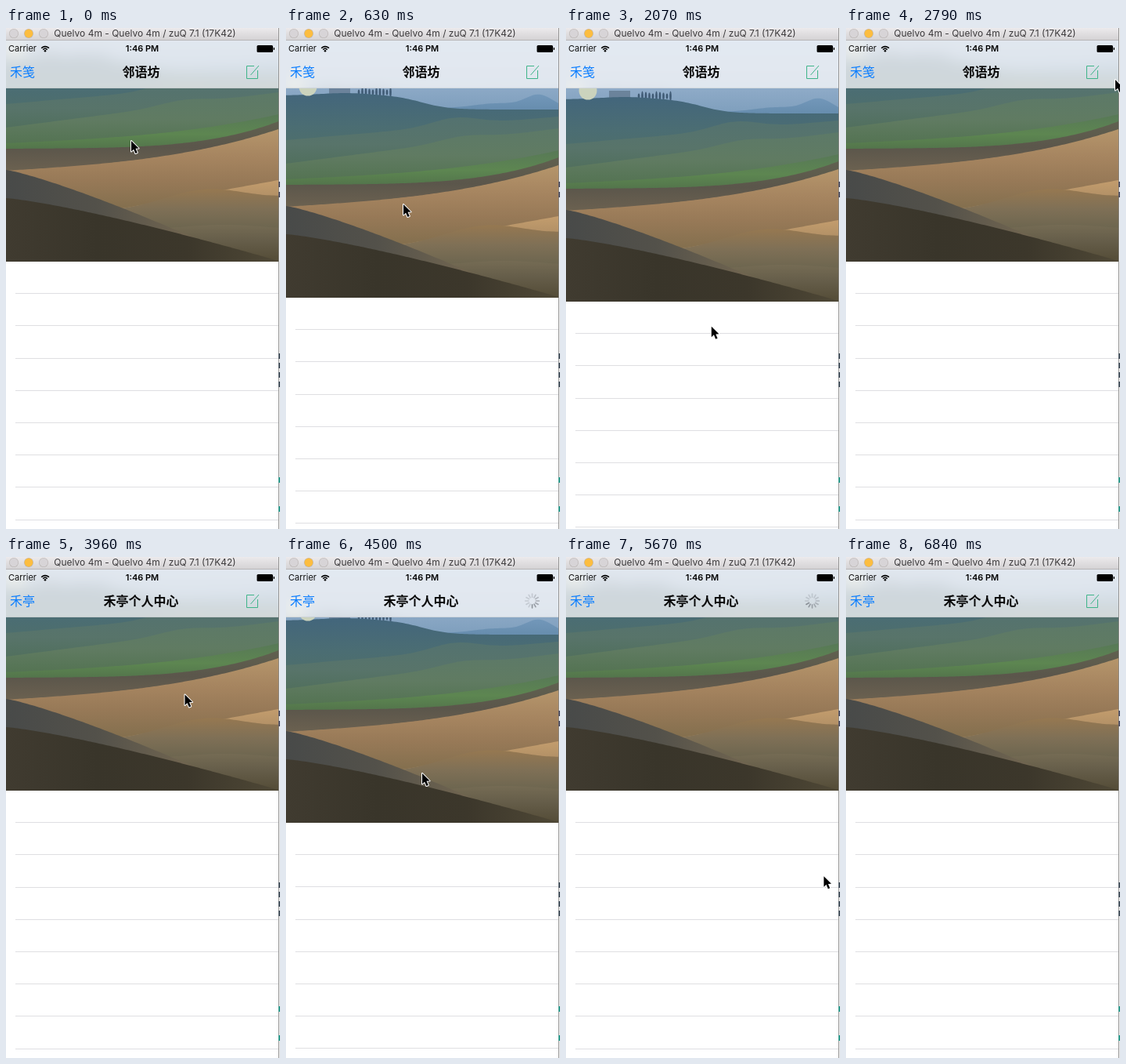
Write an HTML page with a canvas that moves like this. It is 350x639 px and loops after 7.2 s.

```html
<!DOCTYPE html>
<html lang="zh">
<head>
<meta charset="utf-8">
<style>
html, body { margin: 0; width: 100%; height: 100%; overflow: hidden; background: #fff; }
canvas { display: block; width: 350px; height: 639px; }
</style>
</head>
<body>
<canvas id="stage"></canvas>
<script>
const W = 350, H = 639, PAGE = 348, NAV_TOP = 16, NAV_BOTTOM = 77;
const LOOP = 7200, STEP = 90, LAST = 6840;
const REST = 297, PHOTO_H = 371, ROW = 41.2;
const LATIN = 'Inter, Roboto, sans-serif';
const HAN = '"Noto Sans CJK SC", "Noto Sans CJK", sans-serif';

const stage = document.getElementById('stage');
const ratio = window.devicePixelRatio || 1;
stage.width = W * ratio;
stage.height = H * ratio;
const ctx = stage.getContext('2d');

// Steady drag up to the release, then a decelerating return.
function tug(t, start, release, height) {
  if (t < start) return 0;
  if (t < release) return height * (t - start) / (release - start);
  return height * Math.max(0, 1 - (t - release) / 450) ** 2;
}
const pull = t => tug(t, 90, 1080, 84) + tug(t, 1530, 1980, 80) + tug(t, 4230, 5220, 151);

// Waypoints: time, x, y.
const route = [
  [0, 160, 144], [630, 150, 225], [1080, 162, 291], [1440, 162, 291], [1980, 166, 420],
  [2790, 344, 66], [3150, 380, 60], [4230, 178, 214], [4500, 174, 276], [5220, 166, 443], [5760, 362, 400]
];
function cursorAt(t) {
  const i = route.findIndex(point => point[0] > t);
  if (i < 0) return [W + 20, 0];
  const [t0, x0, y0] = route[i - 1], [t1, x1, y1] = route[i];
  const k = (t - t0) / (t1 - t0);
  return [x0 + (x1 - x0) * k, y0 + (y1 - y0) * k];
}

function disc(c, x, y, r, color) {
  c.fillStyle = color;
  c.beginPath();
  c.arc(x, y, r, 0, Math.PI * 2);
  c.fill();
}

function paintPhoto() {
  const photo = document.createElement('canvas');
  photo.width = PAGE;
  photo.height = PHOTO_H;
  const c = photo.getContext('2d');
  const bump = (u, center, width) => Math.exp(-(((u - center) / width) ** 2));
  const blend = (g, colors) => {
    colors.forEach((color, i) => g.addColorStop(i / (colors.length - 1), color));
    return g;
  };
  const down = (y0, y1, ...colors) => blend(c.createLinearGradient(0, y0, 0, y1), colors);
  const across = (...colors) => blend(c.createLinearGradient(0, 0, PAGE, 0), colors);
  // Fills below a ridge given as height over u = 0..1.
  const land = (fill, ridge) => {
    c.fillStyle = fill;
    c.beginPath();
    c.moveTo(0, PHOTO_H);
    for (let x = 0; x <= PAGE; x += 3) c.lineTo(x, ridge(x / PAGE));
    c.lineTo(PAGE, PHOTO_H);
    c.fill();
  };

  c.fillStyle = down(0, 130, '#9cc3de', '#97b8d6', '#99b1ce', '#8fabc8', '#7f9fbd');
  c.fillRect(0, 0, PAGE, PHOTO_H);
  land(down(108, 135, '#7499bb', '#658bac'), u => 129 - 16 * bump(u, 0.93, 0.07) - 6 * bump(u, 0.78, 0.12));
  c.fillStyle = '#6b839b';
  c.fillRect(55, 102, 27, 11);
  c.fillStyle = '#3f5a74';
  for (let i = 0; i < 10; i++) {
    c.beginPath();
    c.ellipse(93 + i * 4.5, 109, 1.3, 3.5 + (i * 3) % 4, 0, 0, Math.PI * 2);
    c.fill();
  }
  land(down(110, 235, '#43667c', '#4b6d73', '#507067', '#557857'),
    u => 131 - 18 / (1 + Math.exp((u - 0.5) / 0.05)) - 3 * bump(u, 0.22, 0.14));
  land(down(135, 215, '#537271', '#58746a', '#4d6d56'), u => 170 - 30 * u - 10 * bump(u, 0.62, 0.12));
  land(down(150, 230, '#5c7969', '#607b62', '#50714e'), u => 200 - 45 * u - 6 * bump(u, 0.65, 0.12));
  land(down(185, 232, '#587a56', '#5d8651', '#50704a'), u => 220 - 16 * u - 21 * u ** 3);
  land(down(195, 255, '#60604f', '#5b564b', '#6b6150'), u => 227 - 2 * u - 33 * u ** 4);
  land(down(205, 300, '#b4946a', '#a68560', '#977957', '#85704f'), u => 255 - 22 * u - 31 * u ** 3);
  land(down(268, 300, '#c29c6d', '#a98a62'), u => 330 - 63 * u);
  land(down(278, 355, '#967851', '#7f7056', '#6c654f', '#5f5744'),
    u => 307 - 24 * bump(u, 0.73, 0.22) - 15 * u ** 4);
  land(down(320, 370, '#786e56', '#655d49', '#544c37'), u => 330 - 6 * bump(u, 0.8, 0.2));
  land(across('#484a49', '#53514a', '#716550', '#7b6b50'), u => 254 + 135 * u ** 1.2);
  land(across('#403b30', '#39352a', '#3c372b', '#4f4836'), u => 290 + 80 * u ** 1.25);
  disc(c, 28, 102, 11.5, '#cbd3bd');
  return photo;
}
const photo = paintPhoto();

function label(text, x, y, font, color, align = 'left') {
  ctx.font = font;
  ctx.fillStyle = color;
  ctx.textAlign = align;
  ctx.textBaseline = 'middle';
  ctx.fillText(text, x, y);
}

function path(points, close) {
  ctx.beginPath();
  points.forEach(([x, y]) => ctx.lineTo(x, y));
  if (close) ctx.closePath();
}

function drawTable(offset) {
  const bottom = REST + offset;
  ctx.drawImage(photo, 0, bottom - PHOTO_H + 1);
  ctx.fillStyle = '#dfdfe2';
  for (let y = bottom + ROW; y < H; y += ROW) ctx.fillRect(12, Math.round(y), PAGE - 12, 1);
}

function drawBarBackground(offset) {
  const height = NAV_BOTTOM - NAV_TOP;
  ctx.save();
  ctx.beginPath();
  ctx.rect(0, NAV_TOP, PAGE, height);
  ctx.clip();
  ctx.fillStyle = '#fff';
  ctx.fillRect(0, NAV_TOP, PAGE, height);
  ctx.filter = 'blur(9px)';
  ctx.drawImage(photo, -20, REST + offset - PHOTO_H + 1, PAGE + 40, PHOTO_H);
  ctx.filter = 'none';
  ctx.fillStyle = 'rgba(250,250,251,.76)';
  ctx.fillRect(0, NAV_TOP, PAGE, height);
  ctx.restore();
  ctx.fillStyle = 'rgba(0,0,0,.14)';
  ctx.fillRect(0, NAV_BOTTOM - 0.5, PAGE, 0.5);
}

function drawStatus() {
  label('Carrier', 3, 26.5, `11px ${LATIN}`, '#111');
  label('1:46 PM', 174, 26.5, `600 11px ${LATIN}`, '#000', 'center');
  ctx.strokeStyle = '#000';
  ctx.lineWidth = 1.6;
  for (const r of [3.6, 6.4]) {
    ctx.beginPath();
    ctx.arc(50, 30, r, -Math.PI * 0.77, -Math.PI * 0.23);
    ctx.stroke();
  }
  disc(ctx, 50, 29.3, 1.3, '#000');
  ctx.fillStyle = '#000';
  ctx.beginPath();
  ctx.roundRect(320.5, 22, 20.5, 9, 1.5);
  ctx.fill();
  ctx.fillRect(341.7, 25, 1.3, 3);
}

function drawCompose() {
  ctx.strokeStyle = '#3eb489';
  ctx.lineWidth = 1;
  path([[317, 48.5], [307.5, 48.5], [307.5, 64.5], [321.5, 64.5], [321.5, 54]]);
  ctx.stroke();
  path([[312.5, 60], [323, 48]]);
  ctx.stroke();
}

function drawSpinner(t) {
  const head = Math.floor(t / 1000 * 12);
  ctx.lineWidth = 1.7;
  ctx.lineCap = 'round';
  for (let i = 0; i < 12; i++) {
    const age = (head - i + 12) % 12;
    const a = i * Math.PI / 6 - Math.PI / 2;
    ctx.strokeStyle = `rgba(100,104,112,${Math.max(0.22, 0.65 - age * 0.07)})`;
    path([4.8, 8.8].map(r => [314.5 + r * Math.cos(a), 56 + r * Math.sin(a)]));
    ctx.stroke();
  }
  ctx.lineCap = 'butt';
}

function drawNavigation(t) {
  const second = t >= 3510;
  label(second ? '禾亭' : '禾笺', 5, 56, `16px ${HAN}`, '#0a7dff');
  label(second ? '禾亭个人中心' : '邻语坊', 172.5, 56, `bold 16px ${HAN}`, '#080808', 'center');
  if (t >= 4320 && t < 6570) drawSpinner(t);
  else drawCompose();
}

// Slivers of the text behind the window's right edge.
function drawSlivers(y, count, gap, color) {
  ctx.fillStyle = color;
  for (let i = 0; i < count; i++) ctx.fillRect(PAGE, y + i * gap, 2, 7);
}

function drawWindow() {
  const bar = ctx.createLinearGradient(0, 0, 0, NAV_TOP);
  bar.addColorStop(0, '#eceaec');
  bar.addColorStop(1, '#d3d1d3');
  ctx.fillStyle = bar;
  ctx.fillRect(0, 0, PAGE, NAV_TOP);
  ctx.fillStyle = '#b8b6b8';
  ctx.fillRect(0, NAV_TOP - 1, PAGE, 1);
  ['#d7d4d7', '#fdbd3f', '#d7d4d7'].forEach((color, i) => {
    disc(ctx, 10 + i * 19, 7, 6, 'rgba(130,120,110,.4)');
    disc(ctx, 10 + i * 19, 7, 5.4, color);
  });
  label('Quelvo 4m - Quelvo 4m / zuQ 7.1 (17K42)', 177.5, 7.5, `12px ${LATIN}`, '#3b393b', 'center');
  ctx.fillStyle = '#fff';
  ctx.fillRect(PAGE, 0, 2, H);
  ctx.fillStyle = '#8e8e8e';
  ctx.fillRect(PAGE, 0, 1, H);
  drawSlivers(196, 2, 13, '#556');
  drawSlivers(415, 4, 12, '#4a5560');
  drawSlivers(573, 2, 37, '#2f9a8c');
}

function drawCursor(x, y) {
  ctx.save();
  ctx.translate(x, y);
  path([[0, 0], [0, 13.5], [3.1, 10.7], [5.4, 16], [7.8, 15], [5.5, 9.8], [9.6, 9.6]], true);
  ctx.lineJoin = 'round';
  ctx.strokeStyle = '#fff';
  ctx.lineWidth = 2;
  ctx.stroke();
  ctx.fillStyle = '#000';
  ctx.fill();
  ctx.restore();
}

function draw(now) {
  const t = Math.min(LAST, Math.floor(now % LOOP / STEP) * STEP);
  const offset = Math.round(pull(t));
  ctx.setTransform(ratio, 0, 0, ratio, 0, 0);
  ctx.fillStyle = '#fff';
  ctx.fillRect(0, 0, W, H);
  drawTable(offset);
  drawBarBackground(offset);
  drawStatus();
  drawNavigation(t);
  drawWindow();
  drawCursor(...cursorAt(t));
}

let start;
function frame(now) {
  start ??= now;
  draw(now - start);
  requestAnimationFrame(frame);
}
draw(0);
requestAnimationFrame(frame);
</script>
</body>
</html>
```
